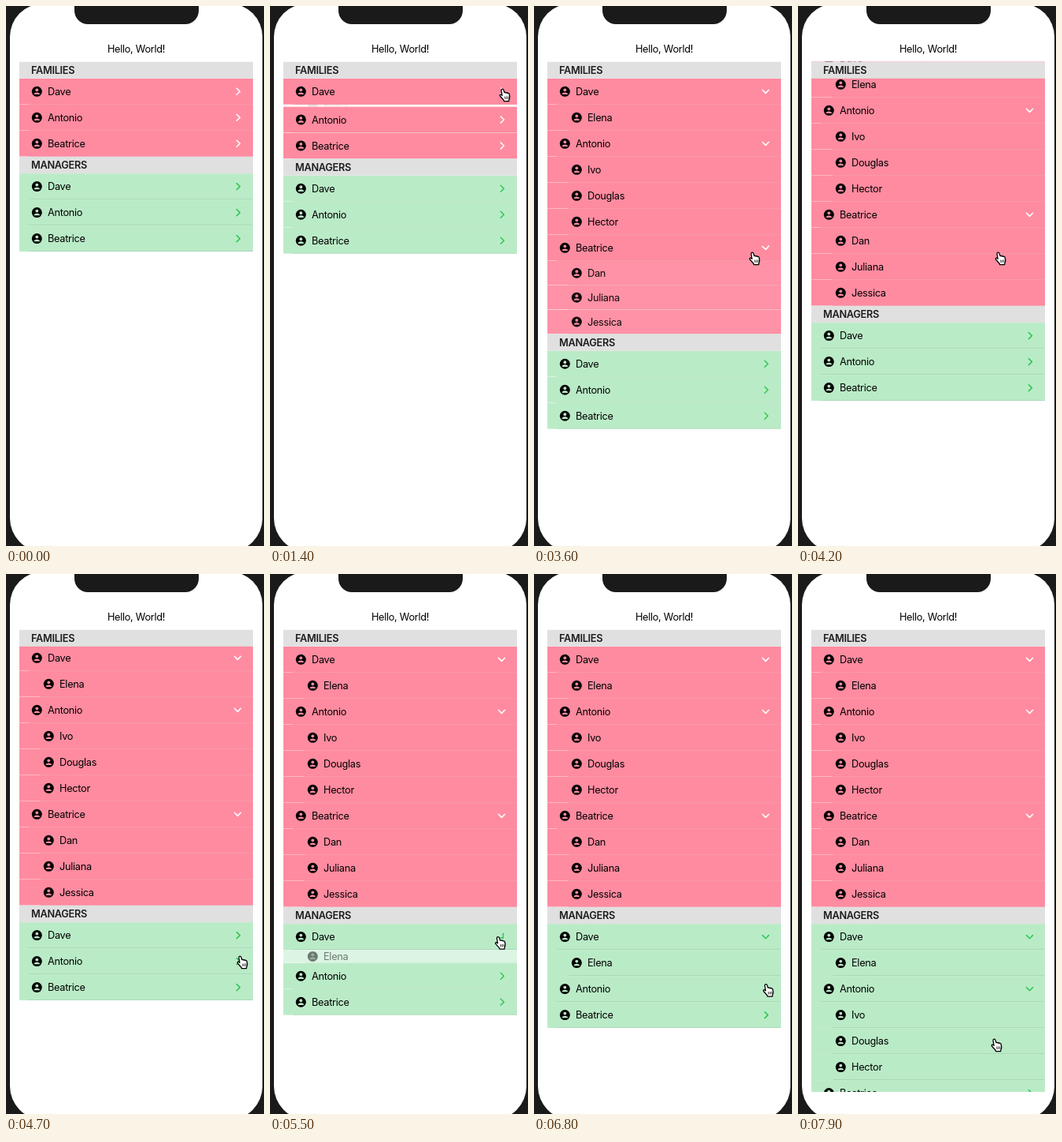
Recreate the animation shown at these times as an HTML page with a canvas. Size 328x684 px, loop 8 s.

```html
<!DOCTYPE html>
<html lang="en">
<head>
<meta charset="utf-8">
<title>Expandable lists</title>
<style>
html, body { margin: 0; width: 100%; height: 100%; overflow: hidden; background: #1a1a1a; }
canvas { display: block; width: 328px; height: 684px; }
</style>
</head>
<body>
<canvas id="stage"></canvas>
<script>
const W = 328, H = 684, LOOP = 8000;
const canvas = document.getElementById('stage');
const ctx = canvas.getContext('2d');
const dpr = window.devicePixelRatio || 1;
canvas.width = W * dpr;
canvas.height = H * dpr;

const LEFT = 17, RIGHT = 314, TOP = 70.5, BOTTOM = 656;
const HEAD = 21.3, ROW = 33, OPEN_MS = 350;
const DARK = '#1a1a1a';

const people = [
  ['Dave', ['Elena']],
  ['Antonio', ['Ivo', 'Douglas', 'Hector']],
  ['Beatrice', ['Dan', 'Juliana', 'Jessica']]
];

// opens: start time of each row's expansion
const sections = [
  { title: 'FAMILIES', fill: '#ff8ba0', line: '#ec8195', tint: '#ffffff', opens: [1340, 2080, 3305] },
  { title: 'MANAGERS', fill: '#baebc7', line: '#a8d5b4', tint: '#34c759', opens: [5325, 7085, Infinity] }
];

// time, x, y
const cursorKeys = [
  [200, 310, 660], [1000, 299, 113], [1550, 299, 113],
  [2000, 298, 179], [2300, 298, 179], [2600, 291, 225],
  [3150, 297, 311], [3350, 297, 311], [3600, 281, 320],
  [3900, 262, 400], [4200, 258, 320], [4400, 268, 360],
  [4700, 301, 492], [5150, 300, 464], [5450, 299, 464],
  [5750, 226, 509], [6100, 216, 404], [6250, 216, 398],
  [6850, 300, 530], [7200, 300, 530], [7700, 253, 597], [8000, 253, 597]
];

// time, list offset
const scrollKeys = [
  [3900, 0], [4200, -42], [4300, -42], [4700, -2], [4800, 0],
  [5750, 0], [6100, -55], [6200, -57], [6400, -14], [6600, 0]
];

const clamp = v => Math.min(1, Math.max(0, v));
const ease = v => v * v * (3 - 2 * v);

function track(keys, t, i) {
  if (t <= keys[0][0]) return keys[0][i];
  for (let k = 1; k < keys.length; k++) {
    const a = keys[k - 1], b = keys[k];
    if (t <= b[0]) return a[i] + (b[i] - a[i]) * ease((t - a[0]) / (b[0] - a[0]));
  }
  return keys[keys.length - 1][i];
}

function text(str, x, y, weight = 400, align = 'left') {
  ctx.font = weight + ' 12.75px Inter, sans-serif';
  ctx.letterSpacing = '-0.3px';
  ctx.textAlign = align;
  ctx.fillText(str, x, y);
}

function disc(x, y, r) {
  ctx.beginPath();
  ctx.arc(x, y, r, 0, Math.PI * 2);
  ctx.fill();
}

function personIcon(x, y, fill) {
  ctx.fillStyle = '#000';
  disc(x, y, 6.5);
  ctx.fillStyle = fill;
  disc(x, y - 2, 1.9);
  ctx.beginPath();
  ctx.ellipse(x, y + 3.7, 3.7, 2.6, 0, Math.PI, 0);
  ctx.fill();
}

function chevron(y, open, color) {
  ctx.save();
  ctx.translate(295.3 - 0.8 * open, y);
  ctx.rotate(open * Math.PI / 2);
  ctx.strokeStyle = color;
  ctx.lineWidth = 1.6;
  ctx.lineCap = ctx.lineJoin = 'round';
  ctx.beginPath();
  ctx.moveTo(-2, -4);
  ctx.lineTo(2.1, 0);
  ctx.lineTo(-2, 4);
  ctx.stroke();
  ctx.restore();
}

function row(name, y, h, indent, sec, alpha) {
  const mid = y + h / 2;
  ctx.save();
  ctx.globalAlpha = alpha;
  ctx.beginPath();
  ctx.rect(LEFT, y, RIGHT - LEFT, h);
  ctx.clip();
  ctx.fillStyle = sec.fill;
  ctx.fillRect(LEFT, y, RIGHT - LEFT, h);
  personIcon(39.3 + indent, mid, sec.fill);
  ctx.fillStyle = '#000';
  text(name, 53 + indent, mid + 4.6);
  ctx.fillStyle = sec.line;
  ctx.fillRect(29 + indent, y + h - 0.9, RIGHT - 29 - indent, 0.8);
  ctx.restore();
}

function header(title, y) {
  ctx.fillStyle = '#e0e0e0';
  ctx.fillRect(LEFT, y, RIGHT - LEFT, HEAD);
  ctx.fillStyle = '#1c1c1e';
  text(title, 32, y + 15.5, 600);
}

function list(t) {
  ctx.save();
  ctx.beginPath();
  ctx.rect(LEFT, TOP, RIGHT - LEFT, BOTTOM - TOP);
  ctx.clip();
  let y = TOP + track(scrollKeys, t, 1);
  const heads = [];
  for (const sec of sections) {
    heads.push([sec.title, Math.max(TOP, y)]);
    y += HEAD;
    people.forEach(([name, kids], i) => {
      const p = ease(clamp((t - sec.opens[i]) / OPEN_MS));
      row(name, y, ROW, 0, sec, 1);
      chevron(y + ROW / 2, p, sec.tint);
      y += ROW;
      if (p > 0) for (const kid of kids) {
        row(kid, y, ROW * p, 15, sec, p);
        y += ROW * p;
      }
    });
  }
  heads.forEach(h => header(...h));
  ctx.restore();
}

const hand = new Path2D('M-5-6q0-1.8 1.5-1.8q1.2 0 1.6 1.5l1 3q1-.8 2 .3q1.2-.6 2 .5q1.6-.5 2 1l.6 3q.2 2-.8 4l-.3 2.2h-6l-.5-1.5l-4.5-5q-1-1.6 .5-2q1 0 2 1.2z');
const creases = new Path2D('M-.4 1.6l.5 3.4M1.7 1.5l.3 3.4M3.7 1.4l.1 3.2');

function cursor(t) {
  if (t < 250) return;
  ctx.save();
  ctx.translate(track(cursorKeys, t, 1), track(cursorKeys, t, 2));
  ctx.lineJoin = 'round';
  ctx.strokeStyle = '#000';
  ctx.fillStyle = '#fff';
  ctx.lineWidth = 1.3;
  ctx.fill(hand);
  ctx.stroke(hand);
  ctx.lineWidth = 0.8;
  ctx.stroke(creases);
  ctx.restore();
}

function phone() {
  ctx.fillStyle = DARK;
  ctx.fillRect(0, 0, W, H);
  ctx.fillStyle = '#fff';
  ctx.beginPath();
  ctx.roundRect(5, -3, 321, 694, 42);
  ctx.fill();
  ctx.fillStyle = DARK;
  ctx.beginPath();
  ctx.roundRect(87, -30, 158, 53, 17);
  ctx.fill();
  ctx.fillStyle = '#000';
  text('Hello, World!', 165.5, 58.8, 400, 'center');
}

function draw(now) {
  const t = now % LOOP;
  ctx.setTransform(dpr, 0, 0, dpr, 0, 0);
  phone();
  list(t);
  cursor(t);
  requestAnimationFrame(draw);
}
requestAnimationFrame(draw);
</script>
</body>
</html>
```
